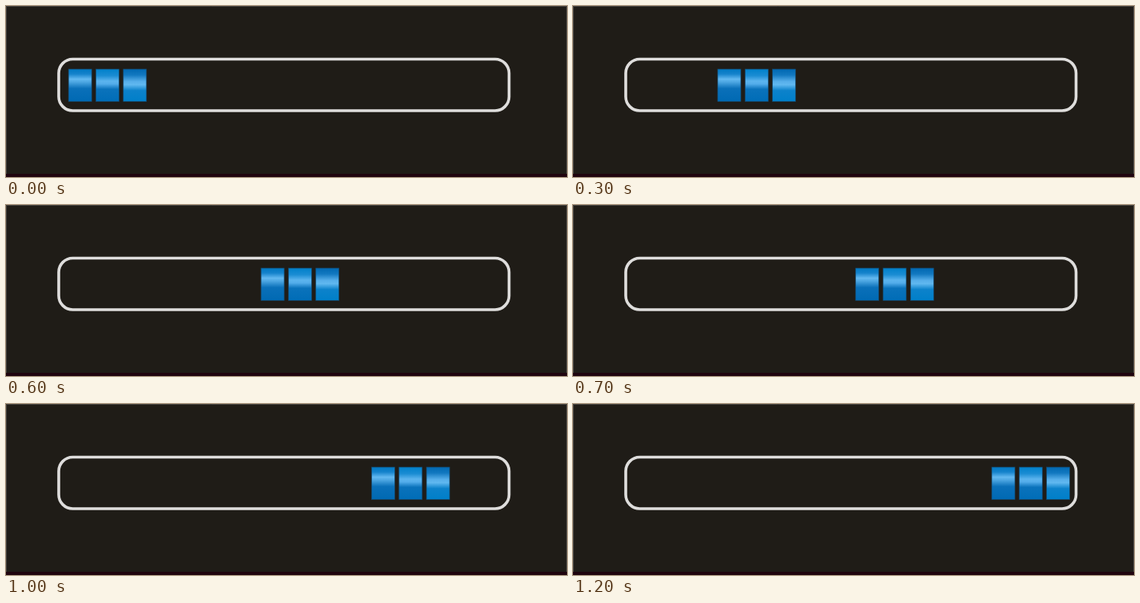
Write an HTML page that moves like this. It is 702 px wide and 214 px high and loops after 1.3 s.

```html
<!DOCTYPE html>
<html>
<head>
<meta charset="utf-8">
<style>
  html, body { margin: 0; width: 100%; height: 100%; overflow: hidden; background: #1f1c17; }
  svg { display: block; }
</style>
</head>
<body>
<svg width="702" height="214" viewBox="0 0 702 214">
  <defs>
    <linearGradient id="left" x2="0" y2="1">
      <stop offset="0" stop-color="#0078c2"/>
      <stop offset=".15" stop-color="#1482cb"/>
      <stop offset=".31" stop-color="#62b8f0"/>
      <stop offset=".4" stop-color="#4ca6e2"/>
      <stop offset=".6" stop-color="#0a70b9"/>
      <stop offset="1" stop-color="#0069b3"/>
    </linearGradient>
    <linearGradient id="middle" x2="0" y2="1">
      <stop offset="0" stop-color="#0080ca"/>
      <stop offset=".2" stop-color="#1a8cd3"/>
      <stop offset=".37" stop-color="#5cb4ee"/>
      <stop offset=".46" stop-color="#52acea"/>
      <stop offset=".62" stop-color="#0a72bb"/>
      <stop offset="1" stop-color="#006db7"/>
    </linearGradient>
    <linearGradient id="right" x2="0" y2="1">
      <stop offset="0" stop-color="#0068b2"/>
      <stop offset=".18" stop-color="#1278c0"/>
      <stop offset=".38" stop-color="#56aeea"/>
      <stop offset=".48" stop-color="#60b8f0"/>
      <stop offset=".66" stop-color="#0c82cb"/>
      <stop offset="1" stop-color="#007fc9"/>
    </linearGradient>
  </defs>
  <rect width="702" height="214" fill="#1f1c17"/>
  <path d="M.5 210V.5H701.5V210" fill="none" stroke="#464440"/>
  <rect y="210" width="702" height="4" fill="#20050f"/>
  <rect x="66" y="66.5" width="563.5" height="64.5" rx="17.5" fill="none" stroke="#dedddc" stroke-width="3.6"/>
  <g id="blocks" stroke="#15486c" stroke-width=".7">
    <rect x="0" y="79" width="29" height="40.5" fill="url(#left)"/>
    <rect x="34.3" y="79" width="29" height="40.5" fill="url(#middle)"/>
    <rect x="68.6" y="79" width="29" height="40.5" fill="url(#right)"/>
  </g>
</svg>
<script>
  const blocks = document.getElementById("blocks");
  // Left edge of the group at each 100 ms step
  const stops = [78.2, 112.5, 146.7, 181, 249.8, 284.2, 319.1, 353.7, 388.5, 423.2, 457.5, 491.6, 524];

  function draw() {
    const step = Math.floor(performance.now() % 1300 / 100);
    blocks.setAttribute("transform", `translate(${stops[step]} 0)`);
    requestAnimationFrame(draw);
  }
  draw();
</script>
</body>
</html>
```
